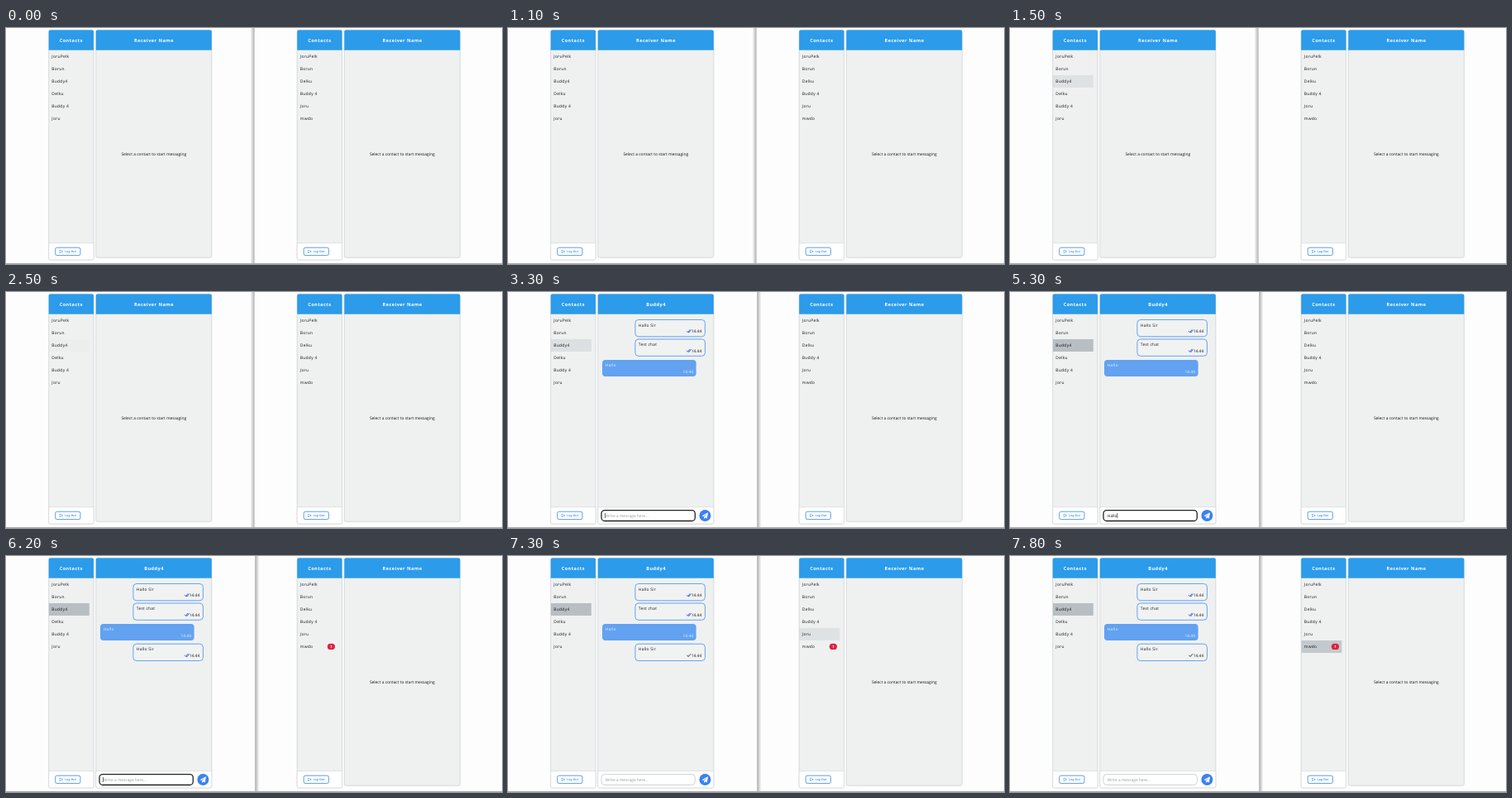
An HTML page that plays this animation: 600x285 px, repeating every 8000 ms.

```html
<!DOCTYPE html>
<html lang="en">
<head>
<meta charset="utf-8">
<title>Two chat windows</title>
<style>
  html, body { margin: 0; width: 100%; height: 100%; overflow: hidden; background: #fdfdfd; }
  svg { display: block; width: 100vw; height: 100vh; }
  text { font: 4.9px "Open Sans", "Noto Sans", sans-serif; fill: #111; white-space: pre; text-rendering: geometricPrecision; }
  .title { font-size: 5.6px; font-weight: 700; letter-spacing: .45px; fill: #fff; text-anchor: middle; }
  .name { letter-spacing: .3px; }
  .message { letter-spacing: .25px; }
  .end { text-anchor: end; }
  .middle { text-anchor: middle; }
  .light { fill: #e8f1fd; }
  .button { font-size: 3.5px; letter-spacing: .1px; fill: #2f80e4; font-weight: 600; }
  .badge { font-size: 4.4px; font-weight: 700; fill: #fff; text-anchor: middle; }
  .hint { font-size: 4.8px; fill: #999; }
  .line { fill: none; stroke-width: .9; stroke-linecap: round; stroke-linejoin: round; }
</style>
</head>
<body>
<svg id="stage" viewBox="0 0 600 285">
  <defs>
    <linearGradient id="shade">
      <stop offset="0" stop-color="#000" stop-opacity="0"/>
      <stop offset="1" stop-color="#000" stop-opacity=".28"/>
    </linearGradient>
  </defs>
</svg>
<script>
const LOOP = 8000;
const SHIFT = 300.5;          // distance between the two windows
const BLUE = '#2b9bea', BODY = '#eff1f1', EDGE = '#cfd3d6';
const ROW_TOP = 57, ROW = 15;

const text = (x, y, content, cls = '', id = '') =>
  `<text x="${x}" y="${y}" class="${cls}" id="${id}">${content}</text>`;
const box = (x, y, w, h, fill, extra = '') =>
  `<rect x="${x}" y="${y}" width="${w}" height="${h}" fill="${fill}" ${extra}/>`;
const group = (id, content, extra = '') => `<g id="${id}" ${extra}>${content}</g>`;

const panel = (x, w, bottom) =>
  box(x, 2.5, w, bottom - 2.5, BODY, `rx="2" stroke="${EDGE}" stroke-width=".8"`) +
  `<path d="M${x} 26.8V4.5q0-2 2-2h${w - 4}q2 0 2 2v22.3z" fill="${BLUE}"/>`;

const footer = (x, w) =>
  `<path d="M${x} 259.7h${w}v18.3q0 2-2 2h${4 - w}q-2 0-2-2z" fill="#fff" stroke="${EDGE}" stroke-width=".6"/>`;

const contacts = (names, highlights) =>
  panel(51.7, 54.3, 280) + footer(51.7, 54.3) +
  text(78.8, 17, 'Contacts', 'title') +
  highlights.map(([id, row]) =>
    box(52, ROW_TOP + (row - 2) * ROW, 48.8, ROW, '#b9bec3', `id="${id}" opacity="0"`)).join('') +
  names.map((name, i) => text(55.3, 36 + i * ROW, name, 'name')).join('') +
  box(59.7, 265.2, 30.2, 9.4, '#fff', 'rx="2" stroke="#4a94ea" stroke-width=".9"') +
  '<path class="line" style="stroke-width:.5" stroke="#2f80e4" d="M66.3 268.3h-1.3v3.2h1.3M66.3 269.9h2.2m-.9-.9.9.9-.9.9"/>' +
  text(71.2, 271.2, 'Log Out', 'button');

const emptyChat = id => group(id,
  panel(108.8, 140, 277.3) +
  text(179, 17, 'Receiver Name', 'title') +
  text(178.8, 154.3, 'Select a contact to start messaging', 'middle'));

const doubleTick = y =>
  `<path class="line" stroke="#3557d6" d="M216.3 ${y - 1.6}l1.3 1.5 2.2-3.2M218.3 ${y - .7}l.7.7 2.2-3.1"/>`;
const singleTick = y =>
  `<path class="line" stroke="#222" d="M216.8 ${y - 1.6}l1.3 1.4 2.7-3"/>`;

const sent = (y, content) =>
  box(153.9, y, 84.5, 20.3, '#f1f2f2', 'rx="4" stroke="#66a3ee" stroke-width="1"') +
  text(157.8, y + 8.2, content, 'message') +
  text(234.2, y + 15.6, '14.44', 'end');

const received = (y, content) =>
  box(114, y, 113.6, 20, '#62a2f1', 'rx="4"') +
  text(117.6, y + 8, content, 'message light') +
  text(224, y + 15.7, '14.44', 'end light');

const openChat = group('chat',
  panel(108.8, 140, 280) + footer(108.8, 140) +
  text(179, 17, 'Buddy4', 'title') +
  group('history',
    sent(33.5, 'Hallo Sir') + doubleTick(49) +
    sent(57, 'Test chat') + doubleTick(72.5) +
    received(82, 'Hallo')) +
  group('newest', sent(106.2, 'Hallo Sir') +
    group('pending', doubleTick(121.7)) + group('delivered', singleTick(121.7))) +
  box(113, 263.6, 113.3, 12.9, '#fff', 'id="field" rx="4"') +
  text(117.8, 271.7, 'Write a message here...', 'hint', 'hint') +
  text(117.8, 271.7, '', '', 'draft') +
  box(117.4, 267, .6, 6, '#111', 'id="caret"') +
  '<circle cx="238.4" cy="270" r="7" fill="#3d82ee"/>' +
  '<path d="M234.6 270.2l7.4-4-1.2 7.2-2.5-1-1.3 1.6v-2.4l3.6-3.7-4.4 3.2z" fill="#fff"/>');

const badge = group('badge',
  box(88.3, 105.7, 9.2, 7.4, '#dc2440', 'rx="3.7"') + text(92.9, 111, '1', 'badge'));

document.getElementById('stage').insertAdjacentHTML('beforeend',
  group('rightFocus', box(295.5, 0, 4.7, 285, 'url(#shade)') + box(300, 0, .6, 285, '#bbb')) +
  group('leftFocus', box(301.3, 0, .6, 285, '#aaa') +
    box(-306.5, 0, 4.7, 285, 'url(#shade)', 'transform="scale(-1 1)"')) +
  box(0, 284, 600, 1, '#aaa') +
  contacts(['JoruPelk', 'Borun', 'Buddy4', 'Delku', 'Buddy 4', 'Joru'],
    [['leftThird', 2], ['leftFourth', 3], ['leftFifth', 4]]) +
  emptyChat('empty') + openChat +
  group('right', contacts(['JoruPelk', 'Borun', 'Delku', 'Buddy 4', 'Joru', 'mwdo'],
    [['rightFifth', 4], ['rightSixth', 5]]) + emptyChat('rightEmpty') + badge,
    `transform="translate(${SHIFT} 0)"`));

const el = Object.fromEntries([...document.querySelectorAll('[id]')].filter(e => e.id).map(e => [e.id, e]));
const show = (id, on) => { el[id].style.display = on ? '' : 'none'; };

// Row highlight strength as [time, opacity] pairs, linear in between
const highlights = {
  leftThird: [[1200, 0], [1500, .3], [1600, .3], [1800, 0], [2450, 0], [2700, .32], [3300, .34], [3700, 1]],
  leftFourth: [[1800, 0], [2000, .3], [2200, 0]],
  leftFifth: [[1900, 0], [2100, .25], [2200, 0]],
  rightFifth: [[7100, 0], [7300, .3], [7600, 0]],
  rightSixth: [[7300, 0], [7800, .78]],
};
function valueAt(keys, t) {
  const next = keys.findIndex(([time]) => time > t);
  if (next === 0) return keys[0][1];
  if (next < 0) return keys[keys.length - 1][1];
  const [[t0, a], [t1, b]] = [keys[next - 1], keys[next]];
  return a + (b - a) * (t - t0) / (t1 - t0);
}

const between = (t, a, b) => t >= a && t < b;
const DRAFT = 'Hallo Sir';
const KEYSTROKES = [4500, 4900, 5100, 5200, 5300, 5500, 5800, 5900, 6000];
const OPEN = 2900, SENT = 6100, BLUR = 7200;

function draw(t) {
  for (const id in highlights) el[id].setAttribute('opacity', valueAt(highlights[id], t));

  const opened = t >= OPEN;
  show('empty', !opened);
  show('chat', opened);
  show('rightFocus', !opened);
  show('leftFocus', opened);
  show('history', t >= 3100);
  show('newest', t >= SENT);
  show('pending', t < 6300);
  show('delivered', t >= 6300);
  show('badge', t >= 6200);

  const typed = t < SENT ? KEYSTROKES.filter(k => k <= t).length : 0;
  el.draft.textContent = DRAFT.slice(0, typed);
  show('hint', !typed);

  const focused = between(t, 3100, BLUR);
  el.field.setAttribute('stroke', focused ? '#222' : '#c4c7ca');
  el.field.setAttribute('stroke-width', focused ? 1.3 : .8);
  show('caret', focused && !between(t, 3700, 4300) && !between(t, 6600, 7100));
  el.caret.setAttribute('x', 117.4 + (typed ? el.draft.getComputedTextLength() + .4 : 0));
}

function frame(now) {
  draw(now % LOOP);
  requestAnimationFrame(frame);
}
draw(0);
requestAnimationFrame(frame);
</script>
</body>
</html>
```
